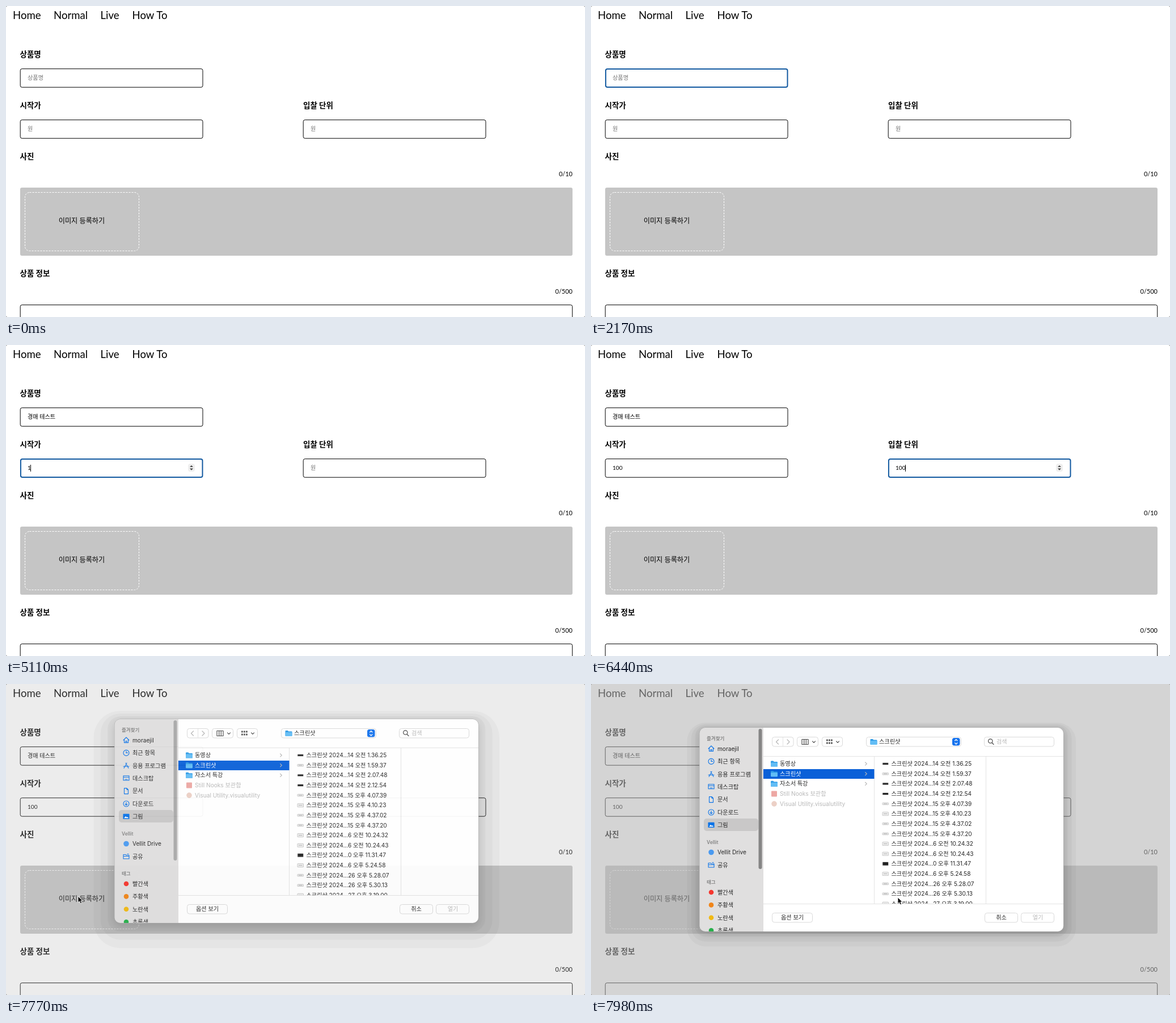
Write an HTML page that moves like this. It is 1021 by 548 pixels and loops after 8000 ms.

```html
<!DOCTYPE html>
<html lang="ko">
<head>
<meta charset="utf-8">
<title>상품 등록</title>
<style>
  html, body { margin: 0; width: 100%; height: 100%; overflow: hidden; background: #8a8a8a; }
  svg { display: block; width: 100%; height: 100%; }
  text { font: 10.15px Lato, "Noto Sans CJK KR", "Noto Sans CJK SC", "Noto Sans CJK JP", sans-serif; white-space: pre; }
  .nav { font-size: 18.6px; }
  .label { font-size: 13.5px; font-weight: 700; }
  .count { font-size: 11px; text-anchor: end; }
  .upload { font-size: 12.2px; text-anchor: middle; }
  .hint { fill: #757575; }
  .line { fill: none; stroke: #000; }
  .focus { fill: none; stroke: #1259a0; stroke-width: 2; }
  #sheet text { font: 10.15px Inter, "Noto Sans CJK KR", "Noto Sans CJK SC", "Noto Sans CJK JP", sans-serif; fill: #262626; }
  #sheet .head { font-size: 8.5px; font-weight: 600; fill: #858585; }
  #sheet .dim { fill: #b8b8b8; }
  #sheet .sel { fill: #fff; }
  #sheet .mid { text-anchor: middle; }
  .rule { stroke: #e3e3e3; }
  .btn { fill: #fff; stroke: #dadada; }
  .blue, .chev, .icon { fill: none; stroke-linecap: round; stroke-linejoin: round; }
  .blue { stroke: #0a73e8; stroke-width: 1.1; }
  .chev { stroke: #b5b5b5; stroke-width: 1.2; }
  .icon { stroke: #4a4a4a; stroke-width: 1.2; }
</style>
</head>
<body>
<svg id="stage" viewBox="0 0 1021 548" preserveAspectRatio="none">
  <defs>
    <clipPath id="frame"><rect x="191.5" y="77" width="641.5" height="359" rx="10"/></clipPath>
    <clipPath id="rows"><rect x="304" y="127" width="529" height="260"/></clipPath>
    <g id="folder">
      <path d="M0-3.8q0-1.2 1.2-1.2h3.2l1.3 1.4h5.1q1.2 0 1.2 1.2v6.2q0 1.2-1.2 1.2H1.2Q0 5 0 3.8z" fill="#2f9be6"/>
      <rect y="-2" width="12" height="7" rx="1.2" fill="#62bdf5"/>
    </g>
    <g id="spin">
      <rect x="-6" y="-7" width="12" height="14" rx="4" fill="#efefef"/>
      <path d="M-3-1.2L0-4.4 3-1.2zM-3 1.2L0 4.4 3 1.2z" fill="#444"/>
    </g>
  </defs>
  <rect width="1021" height="548" rx="3" fill="#fff"/>
  <g id="page"></g>
  <rect id="shade" width="1021" height="548" rx="3" fill="#b2b2b2"/>
  <g id="sheet"></g>
  <path id="arrow" d="M0 0V11.2L2.6 8.8 4.5 13 6.6 12.1 4.8 8H8.2z" fill="#000" stroke="#fff" stroke-width=".9"/>
  <path id="beam" d="M-3.5-6.5Q0-6.5 0-4.5Q0-6.5 3.5-6.5M0-5V5M-3.5 6.5Q0 6.5 0 4.5Q0 6.5 3.5 6.5" fill="none" stroke="#222" stroke-width="1.1"/>
</svg>
<script>
const $ = id => document.getElementById(id);
const text = (x, y, s, cls = '') => `<text x="${x}" y="${y}" class="${cls}">${s}</text>`;
const box = (x, y, w, h, rx, cls) => `<rect x="${x}" y="${y}" width="${w}" height="${h}" rx="${rx}" class="${cls}"/>`;
const fill = (x, y, w, h, rx, color) => `<rect x="${x}" y="${y}" width="${w}" height="${h}" rx="${rx}" fill="${color}"/>`;
const path = (x, y, d, cls) => `<path transform="translate(${x} ${y})" d="${d}" class="${cls}"/>`;
const dot = (x, y, r, color) => `<circle cx="${x}" cy="${y}" r="${r}" fill="${color}"/>`;
const use = (id, x, y) => `<use href="#${id}" x="${x}" y="${y}"/>`;

const fields = [
  { x: 25, y: 110, hint: '상품명' },
  { x: 25, y: 200, hint: '원', number: true },
  { x: 524, y: 200, hint: '원', number: true }
];

function buildPage() {
  const nav = [[12, 'Home'], [84, 'Normal'], [166.5, 'Live'], [222.5, 'How To']];
  const labels = [[24.5, 89.7, '상품명'], [24.5, 179.7, '시작가'], [524, 179.7, '입찰 단위'],
    [24.5, 269.7, '사진'], [24.5, 476.2, '상품 정보']];
  $('page').innerHTML =
    nav.map(([x, s]) => text(x, 22.5, s, 'nav')).join('') +
    labels.map(([x, y, s]) => text(x, y, s, 'label')).join('') +
    text(999, 300, '0/10', 'count') + text(999, 506.5, '0/500', 'count') +
    fill(25, 320, 974, 120, 3, '#c5c5c5') +
    '<rect x="33.5" y="328.5" width="201" height="103" rx="8" fill="none" stroke="#fff" stroke-dasharray="3 2"/>' +
    text(133.5, 383, '이미지 등록하기', 'upload') +
    box(25.2, 526.7, 973.5, 60, 3, 'line') +
    fields.map((f, i) => `<g id="field${i}">` +
      box(f.x + .2, f.y + .7, 321.8, 32.5, 3, 'line') +
      box(f.x + .9, f.y + 1.1, 320.6, 31.8, 3, 'focus') +
      text(f.x + 13, f.y + 20.2, f.hint, 'hint') +
      `<text x="${f.x + 13}" y="${f.y + 20.2}"><tspan></tspan><tspan></tspan></text>` +
      '<path class="under" stroke="#1b6fd0"/><path class="caret" stroke="#000"/>' +
      (f.number ? use('spin', f.x + 302, f.y + 16.3) : '') + '</g>').join('');
  fields.forEach((f, i) => {
    const q = s => $('field' + i).querySelector(s);
    Object.assign(f, { line: q('.line'), ring: q('.focus'), hintEl: q('.hint'), under: q('.under'),
      caret: q('.caret'), spin: q('use'), parts: $('field' + i).querySelectorAll('tspan') });
  });
}

function sidebar() {
  const places = [
    ['moraejil', 'M-5 0L0-5 5 0M-3.5-1V4.5H3.5V-1M-1 4.5V1.5H1V4.5'],
    ['최근 항목', 'M5 0A5 5 0 1 1-5 0A5 5 0 1 1 5 0M0-3V0H2.5'],
    ['응용 프로그램', 'M-4 4.5L1-4.5M4 4.5L-1-4.5M-5 1.5H5'],
    ['데스크탑', 'M-5-4.5H5V3.5H-5zM-5-2H5M-2 1.8H2'],
    ['문서', 'M-3.5-5H1L3.5-2.5V5H-3.5zM1-5V-2.5H3.5'],
    ['다운로드', 'M5 0A5 5 0 1 1-5 0A5 5 0 1 1 5 0M0-2.5V2.5M-2 .7L0 2.7 2 .7'],
    ['그림', 'M-5-4H5V4H-5z']
  ];
  const tags = [['빨간색', '#f5362e'], ['주황색', '#f08519'], ['노란색', '#f0b915'], ['초록색', '#27b04b']];
  return fill(191, 77, 113, 360, 0, '#e0dfdf') +
    fill(199, 237, 96, 22, 5, '#c9c8c8') +
    text(204, 98.8, '즐겨찾기', 'head') +
    fill(207, 244.4, 10, 8, 1, '#0a73e8') + '<path d="M208 251.5l3-3.5 2 2 1.2-1 2 2.5z" fill="#fff"/>' +
    places.map(([s, d], i) => path(212, 114 + i * 22.4, d, 'blue') + text(223, 117.8 + i * 22.4, s)).join('') +
    text(204, 282.3, 'Vellit', 'head') +
    dot(212, 296.5, 4.8, '#4a9af0') + text(223, 300.2, 'Vellit Drive') +
    path(212, 319, 'M-5-3.5H-1L0-2.3H5V4H-5zM-5-.5H5M2-4.5h2', 'blue') + text(223, 322.8, '공유') +
    text(204, 351.8, '태그', 'head') +
    tags.map(([s, c], i) => dot(212, 367 + i * 22.4, 4.3, c) + text(223, 370.8 + i * 22.4, s)).join('') +
    '<rect id="bar" x="295.5" y="79" width="6" height="247" rx="3" fill="#858585"/>';
}

function toolbar() {
  const down = 'M-2.5-1.2L0 1.3 2.5-1.2';
  let grid = '';
  for (let i = 0; i < 6; i++) grid += fill(415 + i % 3 * 4, 97.5 + (i > 2) * 5, 2.8, 3, .6, '#555');
  return box(319.5, 93.5, 37.5, 16.5, 4, 'btn') + path(338.5, 94, 'M0 0V16', 'rule') +
    path(328.5, 102, 'M2-4L-2 0 2 4', 'chev') + path(348, 102, 'M-2-4L2 0-2 4', 'chev') +
    box(363.5, 93.5, 37, 16.5, 4, 'btn') +
    path(377.5, 102, 'M-5.5-4.5H5.5V4.5H-5.5zM-1.8-4.5V4.5M1.8-4.5V4.5', 'icon') + path(393, 102, down, 'icon') +
    box(407.5, 93.5, 36, 16.5, 4, 'btn') + grid + path(435, 102, down, 'icon') +
    box(485.5, 93.5, 167, 16.5, 4, 'btn') + use('folder', 492.5, 102) + text(508, 105.4, '스크린샷') +
    fill(637, 95, 13.5, 13.5, 3.5, '#1673ee') +
    '<path d="M641.3 100.3l2.5-2.6 2.5 2.6m-5 3.1l2.5 2.6 2.5-2.6" fill="none" stroke="#fff" stroke-width="1.3"/>' +
    box(693.5, 93.5, 123, 16.5, 4, 'btn') + path(705, 101.5, 'M3-1A3.7 3.7 0 1 1-4.4-1A3.7 3.7 0 1 1 3-1M2 2L5 5', 'icon') +
    text(715, 105.4, '검색', 'dim');
}

function columns() {
  const step = 17.62, y0 = 140.6;
  const folders = ['동영상', '스크린샷', '자소서 특강'];
  const locked = ['Still Nooks 보관함', 'Visual Utility.visualutility'];
  const shots = ['14 오전 1.36.25', '14 오전 1.59.37', '14 오전 2.07.48', '14 오전 2.12.54', '15 오후 4.07.39',
    '15 오후 4.10.23', '15 오후 4.37.02', '15 오후 4.37.20', '6 오전 10.24.32', '6 오전 10.24.43',
    '0 오후 11.31.47', '6 오후 5.24.58', '26 오후 5.28.07', '26 오후 5.30.13', '27 오후 3.19.00'];
  const dark = [0, 2, 3, 10], tall = [5, 8, 9, 10, 11, 14];
  const thumb = (i, y) => {
    const h = tall.includes(i) ? 7 : 4.5;
    return fill(513.5, y - h / 2, 11.5, h, 1.5, '#c9c9c9') + (dark.includes(i)
      ? fill(514.5, y - h / 2 + .8, 9.5, h - 1.6, .5, '#222')
      : fill(514.5, y - h / 2 + 1, 9.5, h - 2, .5, '#f1f1f1') + fill(516, y - .5, 6.5, 1, 0, '#aaa'));
  };
  return '<g clip-path="url(#rows)">' + fill(304, 150, 195.5, 17, 0, '#0a60d8') +
    folders.map((s, i) => {
      const y = y0 + i * step;
      return use('folder', 317, y) + text(333, y + 3.6, s, i === 1 ? 'sel' : '') + path(485, y, 'M-1.3-2.6L1.3 0-1.3 2.6', 'chev');
    }).join('') +
    locked.map((s, i) => {
      const y = y0 + (i + 3) * step;
      return (i ? dot(323, y, 4.8, '#ecd0c6') : fill(318, y - 5, 10, 10, 1, '#eda8a4')) + text(333, y + 3.6, s, 'dim');
    }).join('') +
    shots.map((s, i) => thumb(i, y0 + i * step) + text(529.5, y0 + i * step + 3.6, '스크린샷 2024...' + s)).join('') +
    '</g>';
}

function buildSheet() {
  $('sheet').innerHTML =
    '<rect class="halo" opacity=".03"/>'.repeat(3) +
    '<rect x="191.5" y="77" width="641.5" height="359" rx="10" fill="#fff" stroke="#aaa" style="filter:drop-shadow(0 5px 7px rgba(0,0,0,.14))"/>' +
    '<g clip-path="url(#frame)">' + fill(304, 77, 530, 360, 0, '#fff') + sidebar() + toolbar() +
    '<path class="rule" d="M304 127.5H833M304 387.5H833M499.5 127V387M696.5 127V387"/>' + columns() +
    box(319.5, 403.5, 71, 16.5, 4, 'btn') + text(355, 415.4, '옵션 보기', 'mid') +
    box(694.5, 403.5, 58, 16.5, 4, 'btn') + text(723.5, 415.4, '취소', 'mid') +
    box(758.5, 403.5, 58, 16.5, 4, 'btn') + text(788, 415.4, '열기', 'mid dim') + '</g>';
}

// [time, committed text, syllable being composed]
const typing = [
  [[0, '', ''], [2240, '', 'ㄱ'], [2380, '', '겨'], [2520, '', '경'], [2660, '경', 'ㅁ'], [2800, '경', '매'],
    [3080, '경매 ', ''], [3290, '경매 ', 'ㅌ'], [3360, '경매 ', '테'], [3500, '경매 ', '텟'], [3640, '경매 테', '스'],
    [3780, '경매 테', '슽'], [3920, '경매 테스', '트']],
  [[0, '', ''], [5110, '1', ''], [5390, '10', ''], [5530, '100', '']],
  [[0, '', ''], [6020, '1', ''], [6230, '10', ''], [6440, '100', '']]
];
// pointer: start, end, hidden at, then a quadratic curve
const legs = [
  [210, 1120, 2170, [119, 456], [20, 280], [114, 122]],
  [4200, 4690, 5110, [114, 122], [100, 165], [84, 216]],
  [6860, 7280, 7770, [84, 216], [82, 300], [84, 386]],
  [7770, 7980, 8000, [127, 374], [330, 365], [541, 376]]
];
const show = (el, on) => el.setAttribute('visibility', on ? 'visible' : 'hidden');
const last = (list, t) => list.filter(e => e[0] <= t).pop();

function drawField(f, i, t, focused) {
  const [, done, live] = last(typing[i], t);
  const [a, b] = f.parts;
  a.textContent = done;
  b.textContent = live;
  show(f.line, !focused);
  show(f.ring, focused);
  show(f.hintEl, !(done + live));
  if (f.spin) show(f.spin, focused);
  const x = f.x + 13, from = x + (done ? a.getComputedTextLength() : 0);
  const end = from + (live ? b.getComputedTextLength() : 0);
  f.under.setAttribute('d', `M${from + .5} ${f.y + 22}H${end}`);
  show(f.under, focused && live);
  f.caret.setAttribute('d', `M${Math.floor(end) + .5} ${f.y + 11}v12`);
  show(f.caret, focused && !(t >= 2170 && t < 2240));
}

function drawPointer(t) {
  const leg = last(legs, t);
  const on = leg && t < leg[2];
  if (!on) { show($('arrow'), false); show($('beam'), false); return; }
  const [t0, t1, , p, c, q] = leg;
  const u = Math.min(1, (t - t0) / (t1 - t0)), k = u * u * (3 - 2 * u);
  const [x, y] = [0, 1].map(n => (1 - k) ** 2 * p[n] + 2 * k * (1 - k) * c[n] + k * k * q[n]);
  const over = t < 7700 && fields.some(f => x > f.x && x < f.x + 322 && y > f.y && y < f.y + 33);
  for (const id of ['arrow', 'beam']) {
    $(id).setAttribute('transform', `translate(${x} ${y})`);
    show($(id), over === (id === 'beam'));
  }
}

// nested rounded bands, wider below than above
function drawHalo(spread) {
  document.querySelectorAll('.halo').forEach((el, i) => {
    const s = spread * (1 - i * .33);
    const size = { x: 191.5 - s, y: 77 - s * .4, width: 641.5 + 2 * s, height: 359 + s * 1.6, rx: 10 + s };
    for (const key in size) el.setAttribute(key, size[key]);
  });
}

function drawSheet(t) {
  const on = t >= 7770;
  const left = on ? Math.pow(.28, (t - 7770) / 70) * (t >= 7980 ? 0 : 1) : 0;
  $('shade').setAttribute('opacity', on ? .56 - .31 * left : 0);
  $('sheet').setAttribute('opacity', 1 - .05 * left);
  $('sheet').setAttribute('transform', `translate(0 ${-15 * left})`);
  $('bar').setAttribute('opacity', 1 - .4 * left);
  $('sheet').setAttribute('display', on ? 'inline' : 'none');
  drawHalo(22 + 15 * left);
}

function draw(now) {
  const t = Math.floor(now % 8000 / 70) * 70;
  const active = t < 1680 ? -1 : t < 4760 ? 0 : t < 5740 ? 1 : t < 7630 ? 2 : -1;
  fields.forEach((f, i) => drawField(f, i, t, i === active));
  drawPointer(t);
  drawSheet(t);
}

buildPage();
buildSheet();
const start = performance.now();
function tick() {
  draw(performance.now() - start);
  requestAnimationFrame(tick);
}
tick();
</script>
</body>
</html>
```
